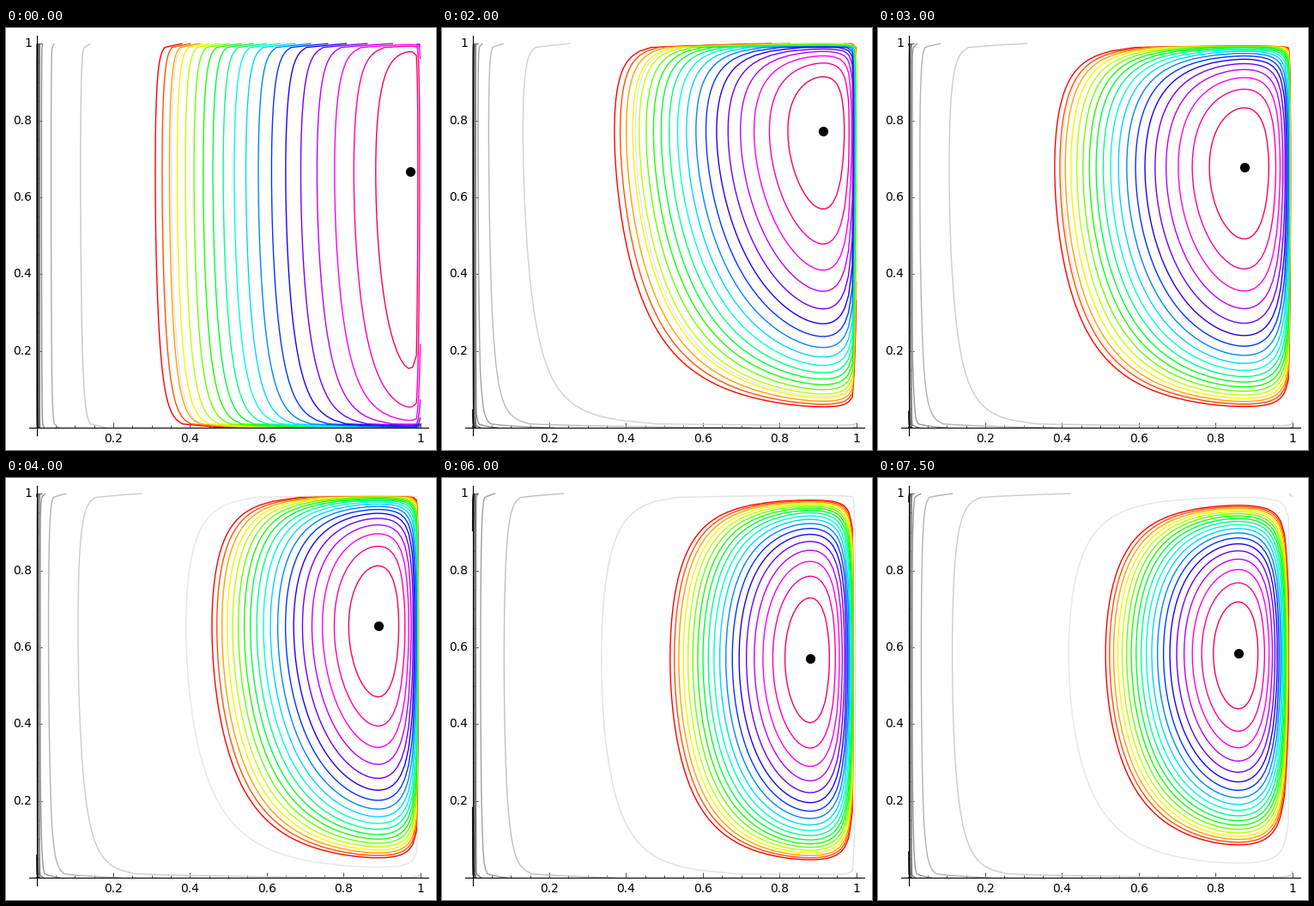
Write a matplotlib script that moves like this. It is 501 by 491 pixels and loops after 8000 ms.

```python
import numpy as np
import matplotlib.pyplot as plt
from matplotlib.animation import FuncAnimation
from matplotlib.colors import hsv_to_rgb
from matplotlib.ticker import FormatStrFormatter, MultipleLocator

W, H, DPI = 501, 491, 100
STEPS, INTERVAL = 16, 500
RINGS = 19

# Plot geometry in pixels: the data origin from the lower left, and the box.
ORIGIN_X, ORIGIN_Y = 35.56, 25.8
BOX, MARGIN = 465, 0.02

# Transition counts (stay A, leave A, stay B, leave B) of a two-state chain;
# ten new transitions arrive at every step.
KEY_STEPS = [0, 4, 6, 8, 10, 12, 15]
KEY_COUNTS = np.array([
    (36, 1, 2, 1),
    (53, 5, 17, 5),
    (63, 9, 19, 9),
    (81, 10, 19, 10),
    (97, 12, 20, 11),
    (110, 15, 20, 15),
    (122, 20, 28, 20),
])

EPS = 1e-4
grid = np.linspace(EPS, 1 - EPS, 100)
X, Y = np.meshgrid(grid, grid)
HUES = [hsv_to_rgb((k / RINGS, 1, 1)) for k in range(RINGS)]
NICE = [m * 10**e for e in range(4) for m in (1, 1.5, 2, 2.5, 3, 4, 5, 6, 8)]


def counts(step):
    return [np.rint(np.interp(step, KEY_STEPS, col)) for col in KEY_COUNTS.T]


def log_like(x, y, a, b, c, d):
    return a * np.log(x) + b * np.log(1 - x) + c * np.log(y) + d * np.log(1 - y)


def round_levels(zmin, zmax, bins=11):
    """Evenly spaced round levels that enclose the data range."""
    for s in NICE:
        lo = s * np.floor(zmin / s)
        if lo + s * bins >= zmax:
            return np.arange(lo, s * np.floor(zmax / s) + 1.5 * s, s)


fig = plt.figure(figsize=(W / DPI, H / DPI), dpi=DPI, facecolor="white")
pad = BOX * MARGIN / (1 + 2 * MARGIN)
ax = fig.add_axes([(ORIGIN_X - pad) / W, (ORIGIN_Y - pad) / H, BOX / W, BOX / H])
ax.patch.set_visible(False)
ax.set(xlim=(-MARGIN, 1 + MARGIN), ylim=(-MARGIN, 1 + MARGIN))

for side in ("top", "right"):
    ax.spines[side].set_visible(False)
for side in ("left", "bottom"):
    ax.spines[side].set_position(("data", 0))
    ax.spines[side].set_linewidth(0.8)
for axis in (ax.xaxis, ax.yaxis):
    axis.set_ticks(np.arange(1, 6) / 5)
    axis.set_major_formatter(FormatStrFormatter("%g"))
    axis.set_minor_locator(MultipleLocator(0.05))
ax.tick_params(which="major", direction="in", length=4, width=0.5, pad=4, labelsize=10)
ax.tick_params(which="minor", direction="in", length=2, width=0.5)
for label in ax.get_yticklabels():
    label.set_va("center")


def draw(step):
    for item in list(ax.collections):
        item.remove()
    a, b, c, d = n = counts(step)
    mode = a / (a + b), c / (c + d)
    peak = log_like(*mode, *n)
    Z = log_like(X, Y, *n)
    style = dict(linewidths=1, linestyles="solid")
    ax.contour(X, Y, Z, levels=round_levels(Z.min(), Z.max()), cmap="gray", **style)
    ax.contour(X, Y, Z, levels=peak - 2 * np.arange(RINGS, 0, -1), colors=HUES, **style)
    ax.scatter(*mode, s=50, c="black", linewidths=1, zorder=5)
    return ax.collections


anim = FuncAnimation(fig, draw, frames=STEPS, init_func=lambda: [],
                     interval=INTERVAL, repeat=True, repeat_delay=0, blit=False)
plt.show()
```
